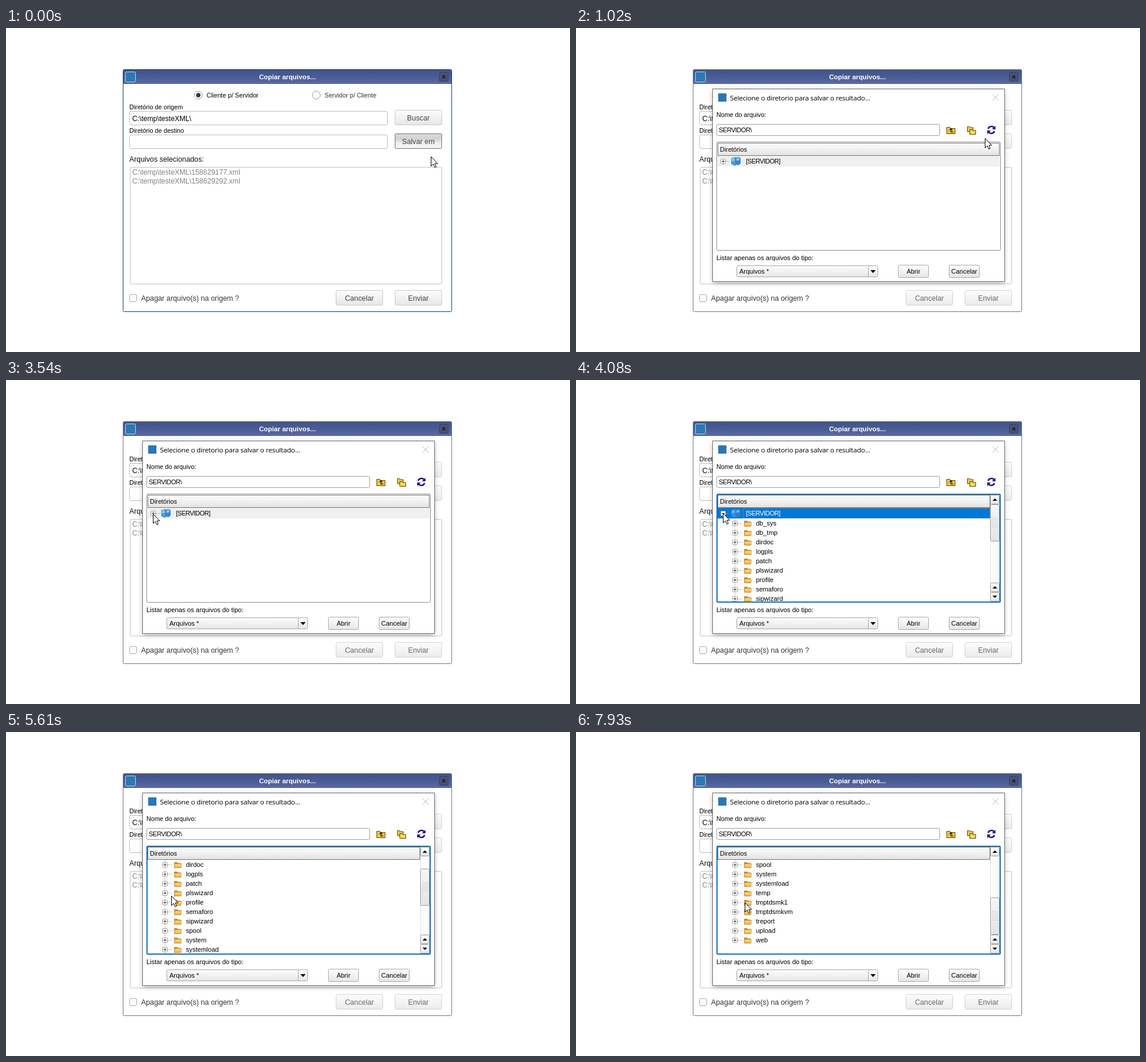
An HTML page for the animation above (8 s loop, 956x550 px).

```html
<!DOCTYPE html>
<html lang="pt">
<head>
<meta charset="utf-8">
<style>
html, body { margin: 0; width: 100%; height: 100%; overflow: hidden; background: #fff; }
svg { display: block; width: 956px; height: 550px; }
text { font: 11px "Liberation Sans", Arial, sans-serif; white-space: pre; }
.small { font-size: 10.7px; }
.large { font-size: 12.3px; }
.path { font-size: 12.1px; }
.caps { letter-spacing: -.5px; }
.title { font-size: 11.4px; font-weight: bold; }
.caption { font-family: "Open Sans", "Noto Sans", sans-serif; font-size: 11.6px; letter-spacing: -.2px; }
.mid { text-anchor: middle; }
</style>
</head>
<body>
<svg id="stage" viewBox="0 0 956 550"></svg>
<script>
const folders = ('db_sys db_tmp dirdoc logpls patch plswizard profile semaforo sipwizard spool ' +
  'system systemload temp tmptdsmk1 tmptdsmkvm treport upload web').split(' ');

// [time, x, y] of the pointer tip
const pointer = [
  [0, 720, 218], [50, 716, 213], [123, 702, 200], [197, 687, 190], [270, 693, 187],
  [2090, 690, 189], [2164, 655, 192], [2238, 585, 197], [2312, 500, 203], [2380, 420, 207],
  [2440, 365, 210], [2500, 321, 212], [2560, 296, 216], [2650, 275, 221], [2740, 262, 226],
  [2830, 254, 230], [2910, 252, 229], [2950, 249, 229], [3160, 249, 228], [3540, 249, 227],
  [3660, 249, 226], [5110, 251, 229], [5185, 258, 240], [5260, 268, 256], [5335, 276, 270],
  [5410, 280, 278], [7930, 286, 289]];
const scrolls = [[0, 0], [5550, 3], [6320, 6], [6900, 9], [7500, 10]];

const box = (x, y, w, h, fill, stroke = 'none', r = 0, extra = '') => {
  const inset = stroke === 'none' ? 0 : .5;
  return `<rect x="${x + inset}" y="${y + inset}" width="${w - 2 * inset}" height="${h - 2 * inset}"
    rx="${r}" fill="${fill}" stroke="${stroke}" ${extra}/>`;
};
const path = (d, fill = 'none', stroke = 'none', extra = '') =>
  `<path d="${d}" fill="${fill}" stroke="${stroke}" ${extra}/>`;
const text = (x, y, s, cls = '', fill = '#000') =>
  `<text x="${x}" y="${y}" class="${cls}" fill="${fill}">${s}</text>`;
const group = (id, content, extra = '') => `<g id="${id}" ${extra}>${content}</g>`;
const gradient = (id, ...colors) => `<linearGradient id="${id}" x2="0" y2="1">` +
  colors.map((c, i) => `<stop offset="${i / (colors.length - 1)}" stop-color="${c}"/>`).join('') +
  '</linearGradient>';

const button = (x, y, label) => box(x, y, 80, 26, 'url(#face)', '#c9c9c9', 2.5) +
  text(x + 40, y + 18, label, 'large mid', '#444');
const dialogButton = (x, label) => box(x, 402, 52, 22, 'url(#face)', '#a8a8a8', 2) +
  text(x + 26, 417, label, 'mid');
const radio = (x, label, on) => `<circle cx="${x}" cy="114" r="6.7" fill="#fff" stroke="#9a9a9a"/>` +
  (on ? `<circle cx="${x}" cy="114" r="3.7" fill="#34364a"/>` : '') +
  text(x + 14, 118, label, 'small', on ? '#000' : '#333');

const dotted = 'stroke-dasharray="1 1"';
const expander = (x, y, open) =>
  path(`M${x + 5} ${y + .5}h7`, 'none', '#999', dotted) +
  box(x - 4, y - 4, 9, 9, '#fff', '#9a9a9a', 1) +
  path(`M${x - 2} ${y + .5}h5` + (open ? '' : `M${x + .5} ${y - 2}v5`), 'none', '#444');
const folder = (x, y) =>
  path(`M${x} ${y - 4}h5l1.5 1.5h5v8h-11.5z`, '#c98a2a') +
  path(`M${x + 1} ${y - 1}h11.5l-1 6.5h-11z`, 'url(#folder)', '#c08428', 'stroke-width=".6"');
const server = (x, y) =>
  path(`M${x} ${y - 5}l7-2 2 2v11l-3 2-6-3z`, '#4a9ad8') +
  path(`M${x + 7} ${y - 6}l6-1 3 2v9l-4 3-5-2z`, '#3a86c8') +
  path(`M${x + 1} ${y - 4}l5-1.5v5l-5 1zM${x + 9} ${y - 5}l5-.6v4l-5 1z`, '#8cc8f0');
const folderRow = (name, i) => {
  const y = 243 + 16 * i;
  return expander(269, y) + folder(285, y) + text(305, y + 4, name);
};

const toolIcons =
  path('M628.5 168.5h5l1.5 2h7.5v9h-14z', '#f5c83a', '#5a4208') +
  path('M633 173.5l2.5-3 2.5 3M635.5 171v5.5h4', 'none', '#222', 'stroke-width="1.3"') +
  path('M663.5 167.5h4l1 1.5h4.5v7h-9.5z', '#f5c83a', '#5a4208') +
  path('M667.5 172.5h4l1 1.5h5v6.5h-10z', '#fbd95c', '#5a4208') +
  path('M698.5 171a6 6 0 0 1 10.5-1.5M709.5 175a6 6 0 0 1-10.5 1.5', 'none', '#15107c', 'stroke-width="2.4"') +
  path('M711 166v6h-6zM697 180v-6h6z', '#15107c');

const mainWindow =
  box(198, 70, 558, 412, '#fff', '#123f60', 2, 'id="frame"') +
  box(199, 71, 556, 24, 'url(#titlebar)') +
  box(202, 74, 18, 18, '#2a78b5', '#b9d8ec', 2) +
  text(477, 87, 'Copiar arquivos...', 'title mid', '#fff') +
  box(734, 75, 16, 16, '#4a5272', '#38405e', 2) +
  path('M739.5 80.5l5 5m0-5l-5 5', 'none', '#15192a', 'stroke-width="1.6"') +
  radio(326, 'Cliente p/ Servidor', true) + radio(526, 'Servidor p/ Cliente') +
  text(209, 138, 'Diretório de origem', 'small') +
  box(209, 141, 438, 24, '#fff', '#bdbdbd', 2.5) +
  text(214, 158, String.raw`C:\temp\testeXML` + '\\', 'path') +
  text(209, 178, 'Diretório de destino', 'small') +
  box(209, 181, 438, 24, '#fff', '#bdbdbd', 2.5) +
  text(209, 227, 'Arquivos selecionados:', 'large', '#111') +
  box(210, 236, 529, 199, '#fff', '#c2c2c2', 2) +
  [158629177, 158629292].map((n, i) =>
    text(214, 249 + 15 * i, String.raw`C:\temp\testeXML` + `\\${n}.xml`, 'path', '#7f8579')).join('') +
  box(209, 452, 13, 13, '#fff', '#a8a8a8', 2.5) +
  text(229, 463, 'Apagar arquivo(s) na origem ?', 'large', '#333') +
  group('buttons', button(659, 139, 'Buscar') + button(659, 179, 'Salvar em') +
    box(659, 179, 80, 26, 'url(#focused)', '#66718a', 2.5, 'id="save"') +
    text(699, 197, 'Salvar em', 'large mid', '#444') +
    button(559, 445, 'Cancelar') + button(659, 445, 'Enviar'));

const arrowButton = (y, up) => box(702, y, 16, 16, 'url(#face)', '#9c9c9c', 2) +
  path(up ? `M706 ${y + 10}h8l-4-4z` : `M706 ${y + 6}h8l-4 4z`, '#000');
let grip = '';
for (let y = 234; y < 252; y += 3) grip += path(`M705 ${y + .5}h11`, 'none', '#b0b0b0', 'stroke-dasharray="1 2"');

const collapsedTree =
  box(238, 193, 482, 185, '#fff', '#8e8e8e', 2) +
  box(240, 217, 478, 18, '#f0f0f0') +
  expander(249, 226) + server(263, 226) + text(288, 230, '[SERVIDOR]', 'caps') +
  box(240, 195, 478, 22, 'url(#header)', '#777');
const expandedTree =
  box(238.5, 193.5, 481, 184, '#fff', '#1673bd', 1.5, 'stroke-width="2"') +
  `<g clip-path="url(#rows)">` + group('list',
    box(240, 217, 462, 18, '#0078d7') +
    box(283, 217, 419, 18, 'none', '#e08830', 0, dotted) +
    expander(249, 226, true) + group('', server(263, 226), 'opacity=".75"') +
    text(288, 230, '[SERVIDOR]', 'caps', '#fff') +
    path(`M269.5 235V${243 + 16 * (folders.length - 1)}`, 'none', '#999', dotted) +
    folders.map(folderRow).join('')) + '</g>' +
  box(240, 195, 462, 22, 'url(#header)', '#777') +
  box(702, 195, 16, 181, '#fbfbfb') +
  path('M702.5 195v181M717.5 195v181', 'none', '#ccc', dotted) +
  group('thumb', box(702, 211, 16, 63, 'url(#thumbFace)', '#9c9c9c', 2) + grip) +
  arrowButton(195, true) + arrowButton(344, true) + arrowButton(360, false);

const dialog =
  box(232, 106, 494, 327, '#000', 'none', 2, 'opacity=".3" filter="url(#blur)"') +
  box(231, 103, 496, 328, '#fff', '#6e6e6e') +
  box(241, 111, 14, 14, '#2a78b5') +
  text(261, 123, 'Selecione o diretorio para salvar o resultado...', 'caption') +
  path('M706 113l10 10m0-10l-10 10', 'none', '#bcbcbc') +
  text(238, 151, 'Nome do arquivo:', 'small') +
  box(238, 163, 379, 20, '#fff', '#9e9e9e', 2) +
  text(242, 177, 'SERVIDOR\\', 'caps') + toolIcons +
  group('collapsed', collapsedTree) + group('expanded', expandedTree) +
  text(244, 210, 'Diretórios', 'small') +
  text(238, 394, 'Listar apenas os arquivos do tipo:') +
  box(272, 403, 240, 20, 'url(#face)', '#a8a8a8', 2) +
  path('M495.5 404v18', 'none', '#a8a8a8') + path('M499 411h9l-4.5 5z', '#000') +
  text(277, 417, 'Arquivos *') +
  dialogButton(546, 'Abrir') + dialogButton(632, 'Cancelar');

const stage = document.getElementById('stage');
stage.innerHTML = '<defs>' +
  gradient('titlebar', '#42548a', '#4a5c95', '#5b6ba2') +
  gradient('face', '#fcfcfc', '#f2f2f2', '#e6e6e6') +
  gradient('pressed', '#c6c6c6', '#d6d6d6', '#e2e2e2') +
  gradient('resting', '#dcdcdc', '#d2d2d2', '#f0f0f0', '#f6f6f6') +
  gradient('focused', '#f4f4f4', '#e6e6e6', '#cfcfcf') +
  gradient('header', '#fdfdfd', '#f1f1f1', '#e2e2e2') +
  gradient('thumbFace', '#f6f6f6', '#e4e4e4') +
  gradient('folder', '#ffe694', '#eda83a') +
  '<filter id="blur" x="-10%" y="-10%" width="120%" height="120%"><feGaussianBlur stdDeviation="4"/></filter>' +
  '<clipPath id="rows"><rect x="240" y="217" width="462" height="159"/></clipPath></defs>' +
  mainWindow + group('dialog', dialog) +
  group('cursor', path('M.5 .5V16.5L4.2 13.1 6.7 18.6 9.2 17.5 6.8 12.1H11.6Z', '#fff', '#000'));

const part = id => document.getElementById(id);
const set = (id, name, value) => part(id).setAttribute(name, value);
const show = (id, on) => set(id, 'display', on ? 'inline' : 'none');
const latest = (steps, t) => steps.findLast(step => step[0] <= t);

function render(t) {
  const inactive = t >= 1020;
  set('frame', 'stroke', inactive ? '#6c7682' : '#123f60');
  set('buttons', 'opacity', inactive ? .8 : 1);
  set('save', 'fill', `url(#${t < 590 ? 'resting' : t < 670 ? 'pressed' : 'focused'})`);
  show('save', !inactive);

  show('dialog', t >= 870);
  set('dialog', 'opacity', inactive ? 1 : .75);
  set('dialog', 'transform', inactive ? '' : 'translate(479 267) scale(.98) translate(-479 -267)');
  show('collapsed', t < 4080);
  show('expanded', t >= 4080);

  const rows = latest(scrolls, t)[1];
  set('list', 'transform', `translate(0 ${rows ? -16 * rows - 2 : 0})`);
  set('thumb', 'transform', `translate(0 ${7 * rows})`);
  const [, x, y] = latest(pointer, t);
  set('cursor', 'transform', `translate(${x} ${y})`);
}

const start = performance.now();
function tick() {
  render((performance.now() - start) % 8000);
  requestAnimationFrame(tick);
}
tick();
</script>
</body>
</html>
```
